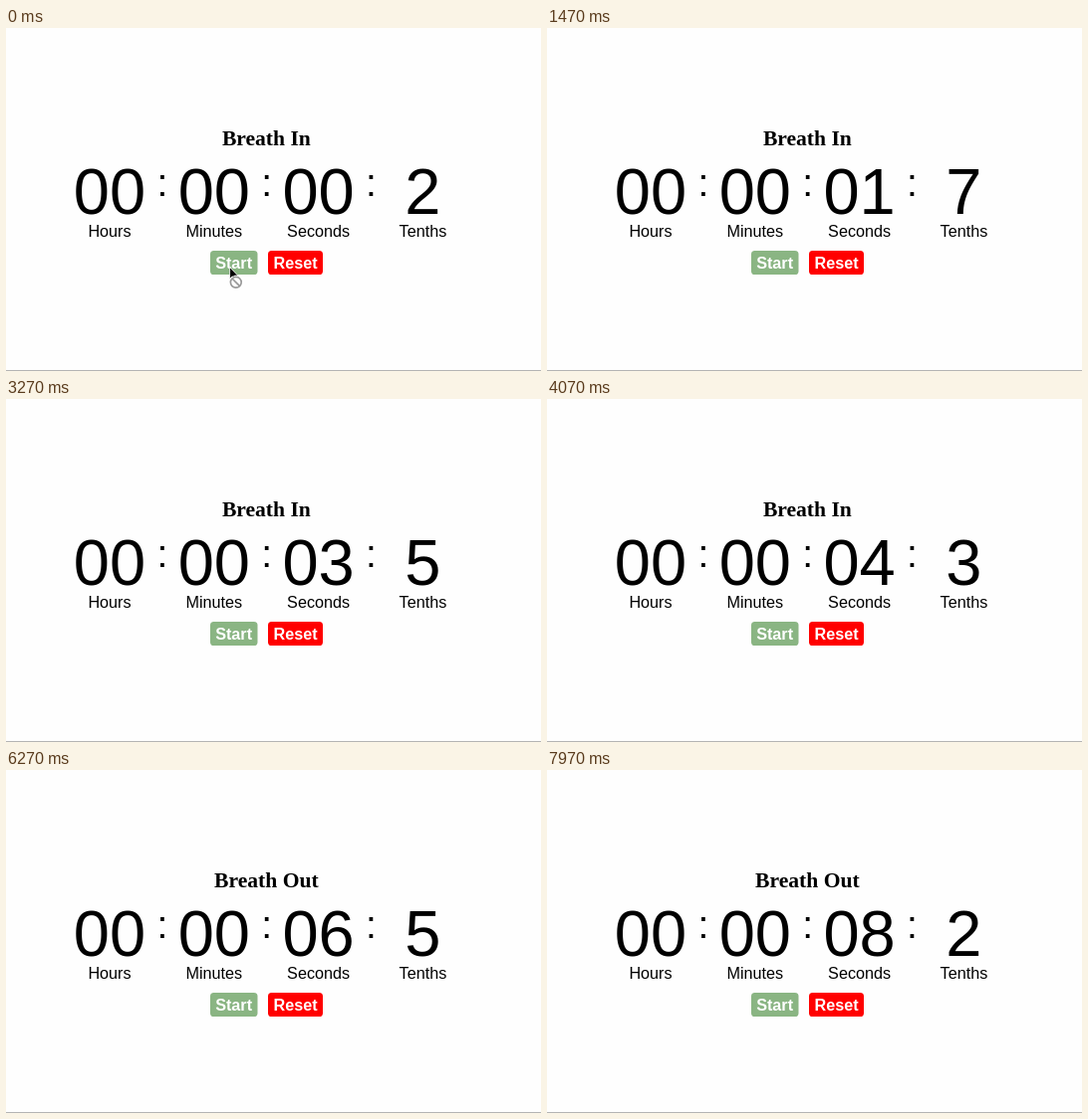
An HTML page that plays this animation: 537x345 px, repeating every 8 s.

```html
<!DOCTYPE html>
<html lang="en">
<head>
<meta charset="utf-8">
<title>Breathing timer</title>
<style>
  html, body { margin: 0; width: 100%; height: 100%; overflow: hidden; background: #fefefe; }
  svg { display: block; width: 537px; height: 345px; }
  text { text-anchor: middle; font-family: "Liberation Sans", Arial, sans-serif; }
  .title { font: bold 21.6px "Liberation Serif", Times, serif; }
  .digits { font-size: 65px; }
  .colon { font-size: 39px; }
  .label { font-size: 16.2px; }
  .button { font-size: 16.2px; font-weight: bold; fill: #fff; }
</style>
</head>
<body>
<svg viewBox="0 0 537 345">
  <rect width="537" height="345" fill="#fefefe"/>
  <rect y="344" width="537" height="1" fill="#b4b4b4"/>
  <text id="title" class="title" x="261.4" y="118"></text>
  <g id="clock"></g>
  <rect x="205" y="224" width="47.5" height="24" rx="3.6" fill="#8ab583"/>
  <text class="button" x="228.6" y="242">Start</text>
  <rect x="263" y="224" width="55" height="24" rx="3.6" fill="#f00"/>
  <text class="button" x="290.6" y="242">Reset</text>
  <g id="cursor">
    <path d="M0 0V11.6L2.7 9.2L4.5 13.2L6.5 12.3L4.8 8.5H8.2Z" fill="#000" stroke="#fff" stroke-width=".8"/>
    <g id="blocked" fill="none">
      <circle cx="6.2" cy="15.2" r="5.4" fill="#fff" stroke="#fff" stroke-width="3"/>
      <path d="M2.4 11.4L10 19" stroke="#999" stroke-width="1.7"/>
      <circle cx="6.2" cy="15.2" r="5.4" stroke="#999" stroke-width="1.7"/>
    </g>
  </g>
</svg>
<script>
const LOOP = 8000;
const CLOCK_START = 230;
const OUT_AT = 60;             // tenths at which the breath turns
const LEAVE = 30, GONE = 560;  // pointer exit, ms
const byId = id => document.getElementById(id);

function addText(cls, x, y, content) {
  const el = document.createElementNS("http://www.w3.org/2000/svg", "text");
  el.setAttribute("class", cls);
  el.setAttribute("x", x);
  el.setAttribute("y", y);
  el.textContent = content;
  byId("clock").append(el);
  return el;
}

const digits = ["Hours", "Minutes", "Seconds", "Tenths"].map((name, i) => {
  const x = 104 + i * 104.8;
  addText("label", x, 210, name);
  if (i < 3) addText("colon", x + 52.8, 169, ":");
  return addText("digits", x, 187, "00");
});

function setText(el, value) {
  if (el.textContent !== value) el.textContent = value;
}

function draw(t) {
  const tenths = Math.floor((t + CLOCK_START) / 100);
  setText(digits[2], String(Math.floor(tenths / 10)).padStart(2, "0"));
  setText(digits[3], String(tenths % 10));
  setText(byId("title"), tenths < OUT_AT ? "Breath In" : "Breath Out");

  const p = Math.min(1, Math.max(0, (t - LEAVE) / (GONE - LEAVE)));
  const ease = p * p * (3 - 2 * p);
  const x = 224.6 + 14 * ease, y = 240.6 + 106 * ease;
  byId("cursor").setAttribute("transform", `translate(${x} ${y})`);
  byId("cursor").style.display = p < 1 ? "" : "none";
  byId("blocked").style.display = y < 248 ? "" : "none";
}

const start = performance.now();
function tick() {
  draw((performance.now() - start) % LOOP);
  requestAnimationFrame(tick);
}
tick();
</script>
</body>
</html>
```
